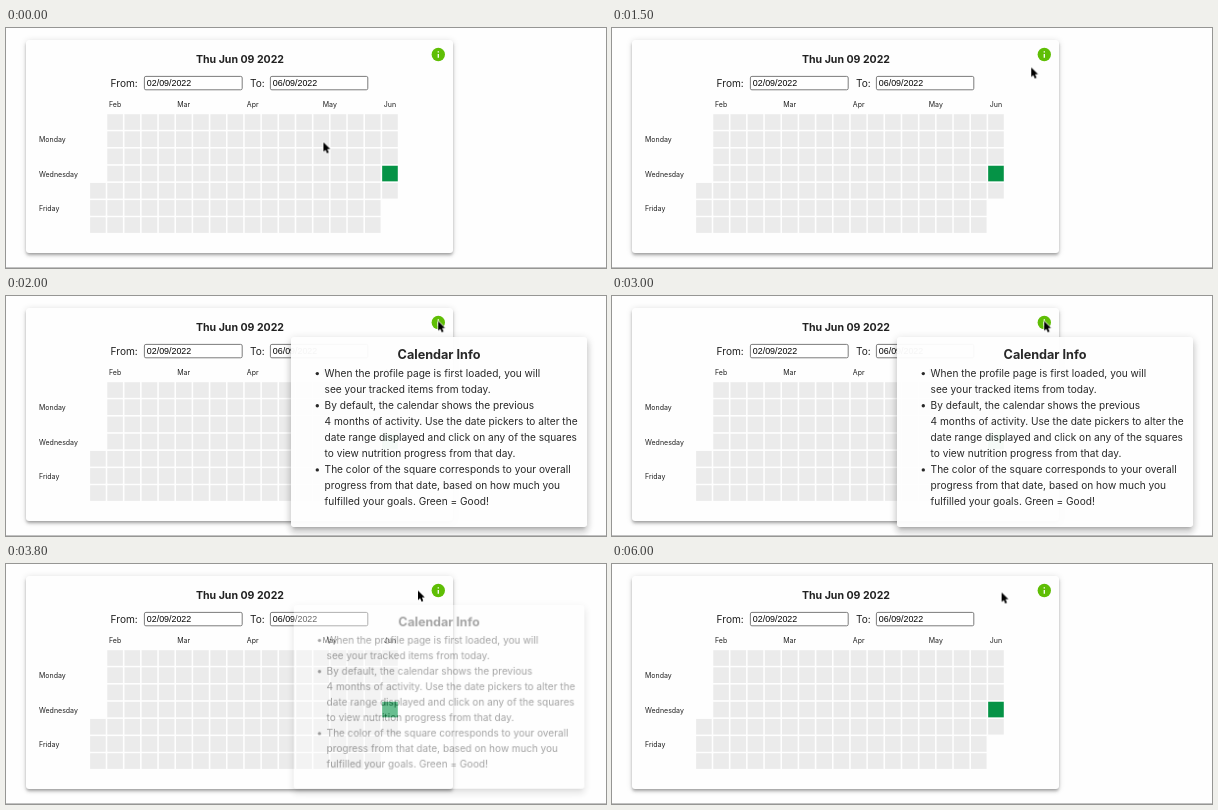
Recreate the animation shown at these times as an HTML page. Size 600 by 240 pixels, loop 6300 ms.

```html
<!DOCTYPE html>
<html lang="en">
<head>
<meta charset="utf-8">
<title>Activity calendar</title>
<style>
  html, body { margin: 0; width: 100%; height: 100%; overflow: hidden; background: #fefefe; }
  #stage { position: relative; width: 600px; height: 240px; overflow: hidden; }
  #stage > * { position: absolute; }
  svg { display: block; overflow: visible; }
  text { font-family: Inter, "Open Sans", sans-serif; font-size: 10.15px; fill: #212121; }
  .title { font-weight: 700; text-anchor: middle; }
  .small { font-size: 7px; }
  .date { font-family: "Liberation Sans", Arial, sans-serif; font-size: 8.9px; fill: #000; }
  .field { fill: #fff; stroke: #6e6e6e; stroke-width: .9; }
  .cell { fill: #ebebeb; }
  .cell.good { fill: #059346; }

  #rule { left: 0; top: 239px; width: 600px; height: 1px; background: #c2c2c2; }
  #card {
    left: 20px; top: 12px; width: 427px; height: 213px; border-radius: 3px; background: #fefefe;
    box-shadow: 0 2px 2.7px -.7px rgba(0,0,0,.22), 0 2.7px 3.3px rgba(0,0,0,.15), 0 .7px 6.7px rgba(0,0,0,.13);
  }
  #calendar { left: 0; top: 0; }

  #info {
    left: 285px; top: 41px; width: 296px; height: 190px; border-radius: 2.7px; background: #fefefe;
    box-shadow: 0 3.3px 3.3px -2px rgba(0,0,0,.2), 0 5.3px 6.7px .7px rgba(0,0,0,.14), 0 2px 9.3px 1.3px rgba(0,0,0,.12);
    transform-origin: 147.5px 0;
    animation: grow 6300ms -2ms step-end infinite;
  }
  #cursor { left: 0; top: 0; animation: move 6300ms -2ms step-end infinite; }
  #cursor path { fill: #000; stroke: #fff; stroke-width: 1.3; paint-order: stroke; stroke-linejoin: round; }

  @keyframes grow {
    0%       { opacity: 0; transform: none; }
    30.1587% { opacity: .69; transform: scale(.975, .95); }
    31.746%  { opacity: .965; transform: none; }
    60.3175% { opacity: .4; transform: scale(.982, .967); }
    61.9048% { opacity: .05; transform: scale(.785, .62); }
    63.4921%, 100% { opacity: 0; transform: none; }
  }
  /* The pointer is sampled every 100 ms. */
  @keyframes move {
    0%       { transform: translate(317.4px, 114.3px); animation-timing-function: steps(3); }
    4.7619%  { transform: translate(351px, 97.5px); }
    6.3492%  { transform: translate(351px, 97.5px); animation-timing-function: steps(7); }
    17.4603% { transform: translate(404px, 71px); animation-timing-function: steps(4); }
    23.8095% { transform: translate(419.2px, 39.5px); animation-timing-function: steps(3); }
    28.5714% { transform: translate(428px, 27px); animation-timing-function: steps(2); }
    31.746%  { transform: translate(432.2px, 25.3px); }
    53.9683% { transform: translate(432.2px, 25.3px); animation-timing-function: steps(3); }
    58.7302% { transform: translate(422.6px, 25.5px); }
    60.3175% { transform: translate(412px, 26.6px); animation-timing-function: steps(3); }
    65.0794% { transform: translate(391px, 28.2px); animation-timing-function: steps(4); }
    71.4286%, 100% { transform: translate(389.6px, 28.5px); }
  }
</style>
</head>
<body>
<div id="stage">
  <div id="rule"></div>
  <div id="card"></div>
  <svg id="calendar" width="600" height="240">
    <text class="title" x="234" y="35.4" style="font-size:10.55px">Thu Jun 09 2022</text>
    <text x="104.6" y="59">From:</text>
    <rect class="field" x="138.4" y="48.4" width="97.8" height="13.4" rx="1.5"/>
    <text class="date" x="140.8" y="58.2">02/09/2022</text>
    <text x="244" y="59">To:</text>
    <rect class="field" x="264.4" y="48.4" width="97.4" height="13.4" rx="1.5"/>
    <text class="date" x="266.8" y="58.2">06/09/2022</text>
    <circle cx="432.3" cy="26.5" r="6.7" fill="#5fbe05"/>
    <path d="M431.65 23.2h1.3v1.3h-1.3zM431.65 25.9h1.3v3.9h-1.3z" fill="#fff"/>
  </svg>
  <div id="info">
    <svg id="notes" width="296" height="190" viewBox="285 41 296 190">
      <text class="title" x="433" y="62.8" style="font-size:12.65px">Calendar Info</text>
    </svg>
  </div>
  <svg id="cursor" width="8" height="12">
    <path d="M0 0V9.4L2.1 7.4 3.6 10.9 5.3 10.2 3.9 6.8H6.8Z"/>
  </svg>
</div>
<script>
  const calendar = document.getElementById('calendar');
  const notes = document.getElementById('notes');

  function add(parent, tag, attrs, label = '') {
    const node = document.createElementNS('http://www.w3.org/2000/svg', tag);
    for (const key in attrs) node.setAttribute(key, attrs[key]);
    node.textContent = label;
    parent.append(node);
  }

  // 18 weeks of days; the first and last weeks are partial
  const pitch = 17.18, size = 15.62, left = 84.1, top0 = 86.2;
  for (let week = 0; week < 18; week++) {
    for (let day = 0; day < 7; day++) {
      if ((week === 0 && day < 4) || (week === 17 && day > 4)) continue;
      add(calendar, 'rect', {
        class: week === 17 && day === 3 ? 'cell good' : 'cell',
        x: left + week * pitch, y: top0 + day * pitch, width: size, height: size
      });
    }
  }

  const months = { Feb: 103, Mar: 171.3, Apr: 240.8, May: 316.8, Jun: 377.8 };
  for (const name in months) add(calendar, 'text', { class: 'small', x: months[name], y: 78.7 }, name);

  ['Monday', 'Wednesday', 'Friday'].forEach((name, i) =>
    add(calendar, 'text', { class: 'small', x: 33, y: 114.2 + i * 2 * pitch }, name));

  // A leading asterisk starts a new bullet.
  [
    '*When the profile page is first loaded, you will',
    'see your tracked items from today.',
    '*By default, the calendar shows the previous',
    '4 months of activity. Use the date pickers to alter the',
    'date range displayed and click on any of the squares',
    'to view nutrition progress from that day.',
    '*The color of the square corresponds to your overall',
    'progress from that date, based on how much you',
    'fulfilled your goals. Green = Good!'
  ].forEach((line, i) => {
    const y = 81 + i * 16.05;
    if (line[0] === '*') add(notes, 'circle', { cx: 311.3, cy: y - 3.4, r: 1.7, fill: '#212121' });
    add(notes, 'text', { x: 318.6, y }, line.replace('*', ''));
  });
</script>
</body>
</html>
```
